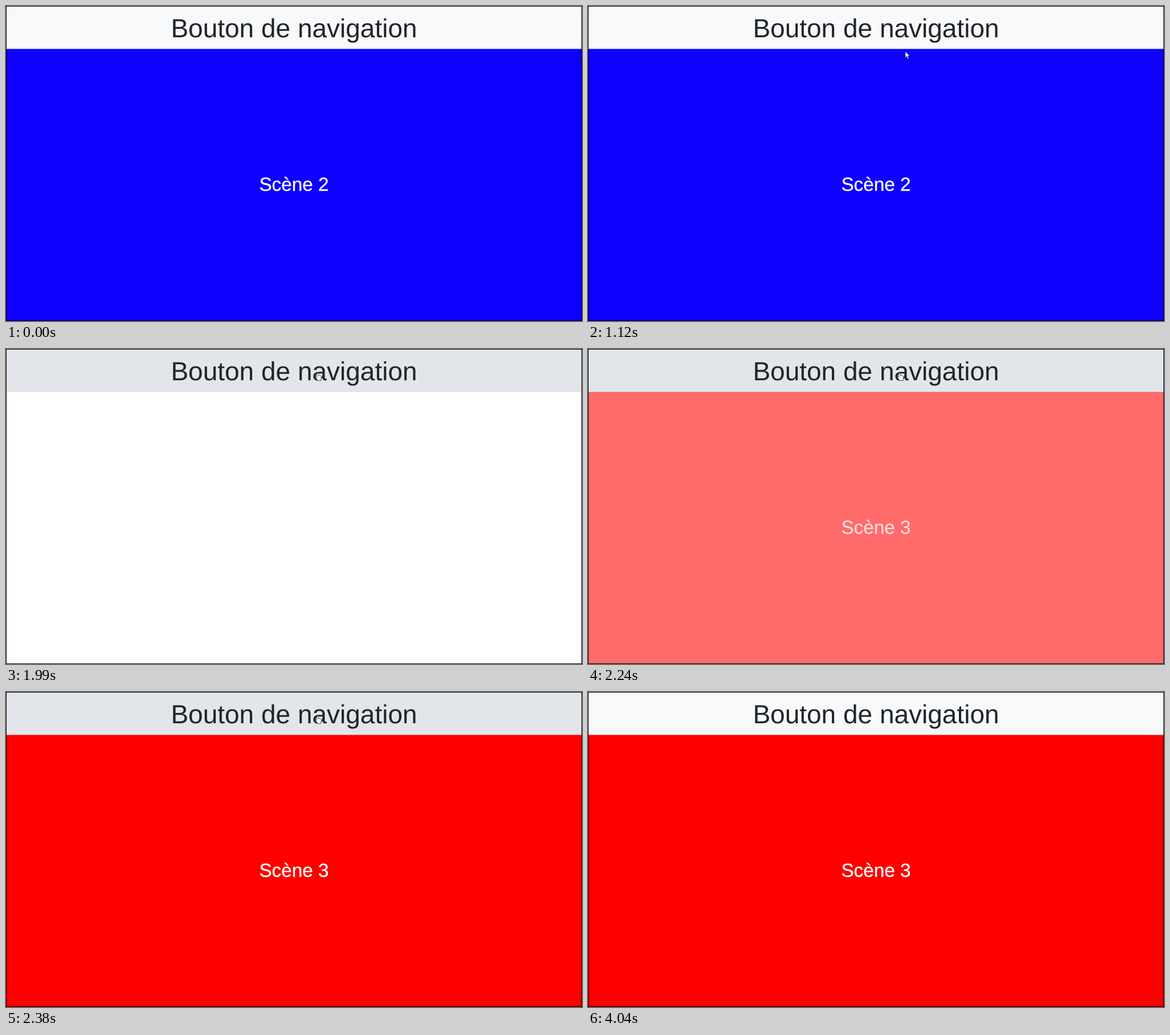
An HTML page for the animation above (4100 ms loop, 1011 by 554 pixels).

```html
<!DOCTYPE html>
<html lang="fr">
<head>
<meta charset="utf-8">
<title>Bouton de navigation</title>
<style>
html, body { margin: 0; width: 100%; height: 100%; overflow: hidden; }
svg { display: block; width: 1011px; height: 554px; }
text { font-family: "Liberation Sans", Arial, sans-serif; text-anchor: middle; text-rendering: geometricPrecision; }
</style>
</head>
<body>
<svg viewBox="0 0 1011 554">
  <rect width="1011" height="554" fill="#fff"/>
  <rect width="1011" height="76" fill="#f8f9fa"/>
  <rect id="hover" width="1011" height="76"/>
  <text x="505.5" y="55" font-size="46" fill="#212529">Bouton de navigation</text>
  <rect id="scene" y="75.5" width="1011" height="479"/>
  <text id="label" x="505.5" y="325" font-size="33.3" fill="#fff" stroke="#fff" stroke-width=".4"></text>
  <rect x=".5" y=".5" width="1010" height="553" fill="none" stroke="#000"/>
  <g id="cursor">
    <path id="arrow" d="M0 0V10.5L2.4 8.4L4.2 12.6L6 11.8L4.2 7.7H7.4Z" fill="#fff" stroke="#111" stroke-width=".5"/>
    <path id="hand" d="M-1.3 7V1Q0-.8 1.3 1V4.5L5.5 5.5Q7 6 6.8 7.5L5.8 11.5V13.5H-.8V12L-4 8Q-3.6 6-1.3 8Z" fill="#fff" stroke="#222" stroke-width=".8"/>
  </g>
</svg>
<script>
const LOOP = 4100, ENTER = 410, PRESS = 1860, CLICK = 1990, FADE = 2240, EXIT = 2790, GONE = 3410, UNHOVER = 4040;
const TICK = 70;
const $ = id => document.getElementById(id);
const set = (id, attrs) => Object.entries(attrs).forEach(([k, v]) => $(id).setAttribute(k, v));
const ramp = (t, from, to) => Math.min(1, Math.max(0, (t - from) / (to - from)));
const mix = (a, b, k) => a + (b - a) * k;
const mixPoint = (p, q, k) => p.map((v, i) => mix(v, q[i], k));
const hold = (t, from) => from + Math.floor((t - from) / TICK) * TICK;

const corner = [944, 543], edge = [557, 80], rest = [547, 42], exit = [900, 542];

// Glide in below the button, step onto it, later speed away
function pointer(t) {
  if (t >= EXIT) return mixPoint(rest, exit, ramp(hold(t, EXIT) + TICK, EXIT, GONE) ** 1.5);
  const s = hold(t, ENTER);
  const glide = 1 - (1 - ramp(s, ENTER, 1110)) ** 2;
  return mixPoint(mixPoint(corner, edge, glide), rest, ramp(s, 1110, 1300));
}

function drawBar(t) {
  const pressed = t >= PRESS && t < CLICK;
  set("hover", {
    fill: pressed ? "#dae0e5" : "#e2e6ea",
    "fill-opacity": t < UNHOVER ? ramp(t, 1130, 1300) : 0
  });
}

function drawScene(t) {
  const next = t >= CLICK;
  const k = ramp(hold(t, FADE), FADE, FADE + 2 * TICK);
  const visible = !next || t >= FADE;
  set("scene", { fill: next ? "#f00" : "#0d00ff", opacity: visible ? (next ? mix(.58, 1, k) : 1) : 0 });
  set("label", { opacity: visible ? (next ? mix(.75, 1, k) : 1) : 0 });
  $("label").textContent = next ? "Scène 3" : "Scène 2";
}

function drawCursor(t) {
  const [x, y] = pointer(t);
  const onBar = y < 75;
  set("cursor", { transform: `translate(${x} ${y})`, opacity: t >= ENTER && t < GONE ? 1 : 0 });
  set("hand", { opacity: onBar ? 1 : 0 });
  set("arrow", { opacity: onBar ? 0 : 1 });
}

function draw(t) {
  drawBar(t);
  drawScene(t);
  drawCursor(t);
}

let start;
function frame(now) {
  start ??= now;
  draw((now - start) % LOOP);
  requestAnimationFrame(frame);
}
draw(0);
requestAnimationFrame(frame);
</script>
</body>
</html>
```
